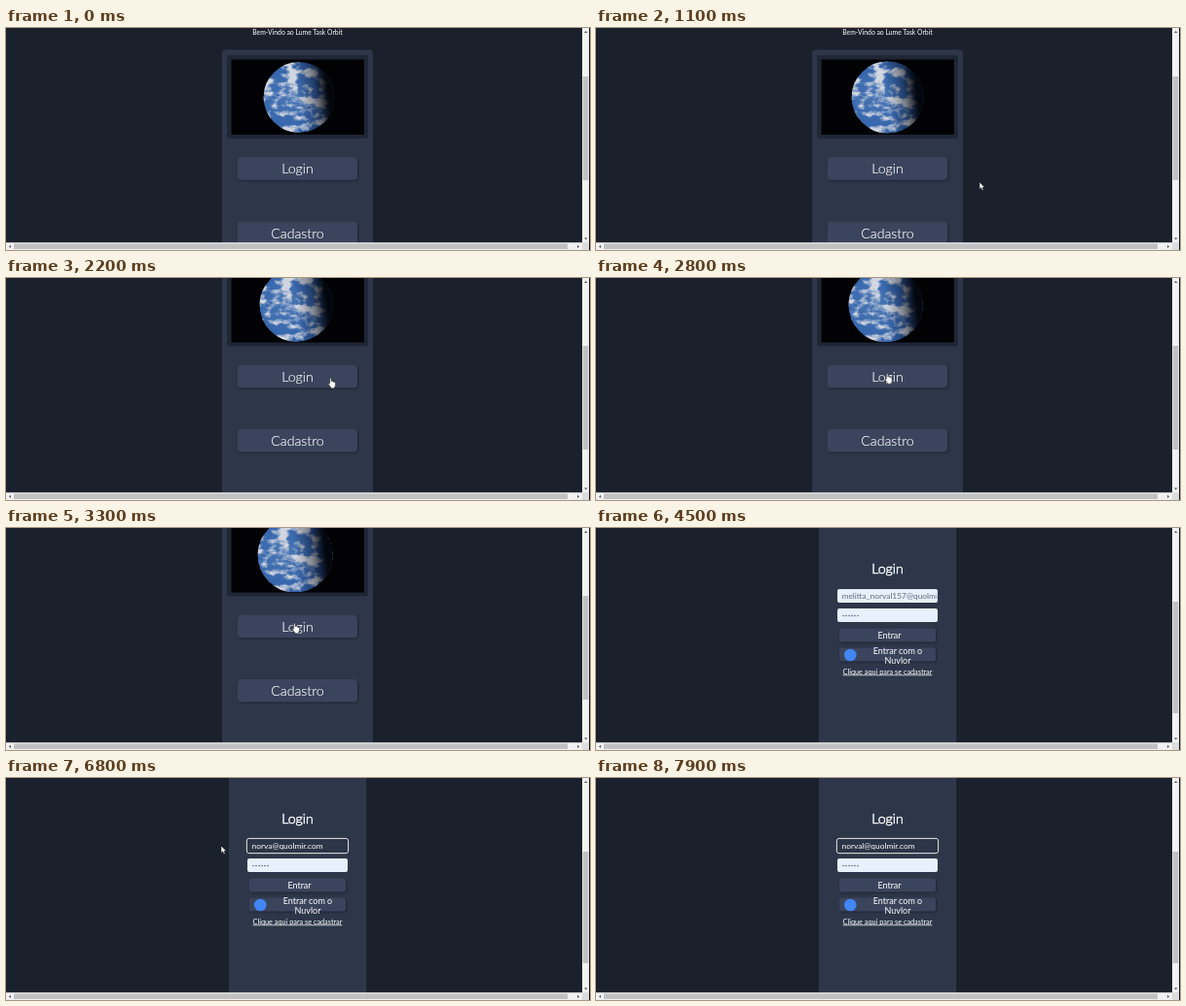
Recreate the animation shown at these times as an HTML page. Size 600 by 229 pixels, loop 8 s.

```html
<!DOCTYPE html>
<html lang="pt">
<head>
<meta charset="utf-8">
<title>Login</title>
<style>
html, body { margin: 0; width: 100%; height: 100%; overflow: hidden; background: #1b212c; }
svg { display: block; }
text { font-family: Lato, "Open Sans", sans-serif; fill: #fff; }
.mid { text-anchor: middle; }
.big { font-size: 14.2px; font-weight: 300; stroke: #fff; stroke-width: .15px; }
.strong { stroke-width: .5px; }
.label { font-size: 9px; }
.entry { font-size: 8.4px; white-space: pre; }
.button { fill: #3a445c; filter: drop-shadow(1.5px 1.5px 1px #1d2433); }
.track { fill: #f1f1f1; }
.thumb { fill: #c1c1c1; }
.arrow { fill: #555; }
</style>
</head>
<body>
<svg width="600" height="229" viewBox="0 0 600 229">
  <defs>
    <clipPath id="view"><path d="M0 0H592V221.500H0z"/></clipPath>
    <clipPath id="photo"><path d="M232 33H368V109.500H232z"/></clipPath>
    <clipPath id="disc"><circle r="37"/></clipPath>
    <clipPath id="fieldClip"><path d="M249 63H350.500V78H249z"/></clipPath>
    <radialGradient id="sea" cx=".35" cy=".5" r=".65">
      <stop stop-color="#4a76b4"/><stop offset=".6" stop-color="#3767ad"/><stop offset="1" stop-color="#2c579a"/>
    </radialGradient>
    <linearGradient id="night" x1="0" y1=".56" x2="1" y2=".42">
      <stop offset=".5" stop-color="#030610" stop-opacity="0"/>
      <stop offset=".72" stop-color="#030610" stop-opacity=".4"/>
      <stop offset=".9" stop-color="#010206" stop-opacity=".95"/>
    </linearGradient>
    <filter id="clouds" x="0" y="0" width="1" height="1" color-interpolation-filters="sRGB">
      <feTurbulence type="fractalNoise" baseFrequency=".07 .1" numOctaves="5" seed="8"/>
      <feColorMatrix values="0 0 0 0 .82  0 0 0 0 .84  0 0 0 0 .88  5 0 0 0 -2.300"/>
    </filter>
  </defs>

  <rect width="600" height="229" fill="#1b212c"/>

  <g clip-path="url(#view)">
    <g id="welcome">
      <text class="mid" x="299.500" y="7.300" font-size="6.800">Bem-Vindo ao Lume Task Orbit</text>
      <rect x="222" y="22.500" width="155" height="320" rx="4" fill="#2e374a"/>
      <rect x="227" y="28" width="145" height="86" rx="2" fill="#1f2635"/>
      <rect x="231.500" y="32.500" width="136.500" height="77.500" fill="#020204"/>
      <g clip-path="url(#photo)">
        <g id="globe">
          <g clip-path="url(#disc)">
            <circle r="37" fill="url(#sea)"/>
            <rect id="cloudLayer" x="-40" y="-40" width="110" height="80" filter="url(#clouds)"/>
            <circle r="37.500" fill="url(#night)"/>
          </g>
        </g>
      </g>
      <rect class="button" x="238" y="133.300" width="123" height="23.500" rx="4"/>
      <text class="mid big" x="299.500" y="150.300">Login</text>
      <rect class="button" x="238" y="199.500" width="123" height="23.500" rx="4"/>
      <text class="mid big" x="299.500" y="216.600">Cadastro</text>
    </g>

    <g id="login">
      <rect x="229" width="141" height="222" fill="#2e374a"/>
      <text class="mid big strong" x="299.500" y="47">Login</text>
      <g id="focusRing" fill="none">
        <rect x="247.500" y="62.500" width="104" height="15" rx="2.500" stroke="#10131a" stroke-width="2.200"/>
        <rect x="247.300" y="62.300" width="104.400" height="15.400" rx="2.500" stroke="#fff"/>
      </g>
      <rect id="field" x="248" y="63" width="103" height="14" rx="2"/>
      <g clip-path="url(#fieldClip)">
        <rect id="highlight" y="64.500" height="11.500" fill="#3486e4"/>
        <text id="email" class="entry" x="252.500" y="73"><tspan></tspan><tspan fill="#f4f8ff"></tspan><tspan></tspan></text>
      </g>
      <rect x="248" y="83" width="103" height="14" rx="2" fill="#e8f0fe"/>
      <path d="M254 90.500H270" stroke="#333a48" stroke-width="1.300" stroke-linecap="round" stroke-dasharray="0 3"/>
      <rect class="button" x="250" y="103.500" width="99" height="14" rx="2"/>
      <text class="mid label" x="301.500" y="114">Entrar</text>
      <rect class="button" x="250" y="123.500" width="99" height="14" rx="2"/>
      <circle cx="261.300" cy="131" r="6.300" fill="#4285f4"/>
      <text class="mid label" x="310" y="129.700">Entrar com o</text>
      <text class="mid label" x="310" y="140">Nuvlor</text>
      <text class="mid" x="299.500" y="150.500" font-size="7.300" text-decoration="underline">Clique aqui para se cadastrar</text>
    </g>
  </g>

  <path class="track" d="M592 0H599V229H0V221.300H592z"/>
  <rect x="592" y="221.300" width="7" height="7.700" fill="#dcdcdc"/>
  <rect id="thumb" class="thumb" x="592.700" width="5.600"/>
  <rect class="thumb" x="8" y="222.500" width="569" height="5.500"/>
  <path class="arrow" d="M594 5l1.700-2 1.700 2zM594 216.500l1.700 2 1.700-2zM5 223.700l-2 1.700 2 1.700zM587 223.700l2 1.700-2 1.700z"/>

  <g id="cursor" stroke="#111" stroke-width=".5">
    <path id="pointer" fill="#fff" d="M0 0V7.300L1.700 5.800 2.900 8.400 4.100 7.900 3 5.300H5.300z"/>
    <path id="hand" fill="#fff" d="M1.600 .8Q2.400-.4 3.200 .8V3.800Q4-.1 4.800 4 5.700 3.600 6.200 4.600 7.400 4.300 7.500 5.600V7.500Q7.300 9 6.400 9.800V10.800H2.800V9.800L.2 6.500Q-.2 5.200 1.600 6z"/>
  </g>
</svg>

<script>
const DURATION = 8000, STEP = 100;
const USER = 'melitta_norval157', NEW_USER = 'norval', HOST = '@quolmir.com';
const OPEN_LOGIN = 3400, FOCUS = 4500, CLEAR = 6300;
const $ = id => document.getElementById(id);
const set = (id, attrs) => { for (const k in attrs) $(id).setAttribute(k, attrs[k]); };
const show = (id, on) => set(id, { display: on ? 'inline' : 'none' });
const clamp = v => Math.min(1, Math.max(0, v));
const mix = (a, b, p) => a + (b - a) * p;
const progress = (t, from, to) => clamp((t - from) / (to - from));
const smooth = p => p * p * (3 - 2 * p);

// Each stop: time, x, y
const cursorPath = [
  [300, 592, 120], [1000, 394, 159], [1400, 394, 159], [2100, 331, 103], [2300, 331, 103],
  [2900, 294, 98], [3700, 294, 98], [4200, 317, 70], [4600, 317, 70],
  [5200, 250, 71], [5400, 224, 72], [5700, 221, 70]
];

function cursorAt(t) {
  const next = cursorPath.findIndex(stop => stop[0] > t);
  if (next < 0) return cursorPath.at(-1).slice(1);
  const [t1, x1, y1] = cursorPath[next], [t0, x0, y0] = cursorPath[Math.max(0, next - 1)];
  const p = t1 > t0 ? smooth(progress(t, t0, t1)) : 0;
  return [mix(x0, x1, p), mix(y0, y1, p)];
}

function drawWelcome(t, scroll) {
  set('welcome', { transform: `translate(0 ${-43.5 * scroll})` });
  const s = t / 1000, radius = 36.5 + 0.65 * s;
  set('globe', { transform: `translate(${301 - 1.2 * s} 71.5) scale(${radius / 37})` });
  set('cloudLayer', { transform: `translate(${-1.5 * s} 0)` });
}

function drawLogin(t) {
  const email = $('email'), cleared = t >= CLEAR;
  const typed = Math.round(clamp(Math.ceil((t - 6480) / 75) / 6) * 6);
  const user = cleared ? NEW_USER.slice(0, typed) : USER;
  const from = cleared ? user.length : Math.round(USER.length * (1 - smooth(progress(t, 4600, 5200))));
  [user.slice(0, from), user.slice(from), HOST].forEach((part, i) => {
    email.children[i].textContent = part;
  });
  email.style.fill = cleared ? '#fff' : '#626a7b';
  set('field', { fill: cleared ? '#2d3548' : '#e8f0fe' });
  show('focusRing', t > FOCUS);

  const before = from ? email.getSubStringLength(0, from) : 0;
  const selected = from < user.length ? email.getSubStringLength(from, user.length - from) : 0;
  set('highlight', { x: 252.5 + before, width: selected });
}

function draw(t) {
  const onLogin = t >= OPEN_LOGIN;
  const scroll = smooth(progress(t, 1600, 2000));
  show('welcome', !onLogin);
  show('login', onLogin);
  if (onLogin) drawLogin(t); else drawWelcome(t, scroll);
  set('thumb', onLogin ? { y: 76, height: 115 } : { y: 50 + 20 * scroll, height: 107 });

  const [x, y] = cursorAt(t);
  const overButton = t >= 1900 && !onLogin;
  set('cursor', { transform: `translate(${x} ${y})` });
  show('cursor', t >= 300 && !(t >= 4100 && t < 5200) && t < 7500);
  show('hand', overButton);
  show('pointer', !overButton);
}

const start = performance.now();
function tick() {
  const t = (performance.now() - start) % DURATION;
  draw(Math.floor(t / STEP) * STEP);
  requestAnimationFrame(tick);
}
tick();
</script>
</body>
</html>
```
